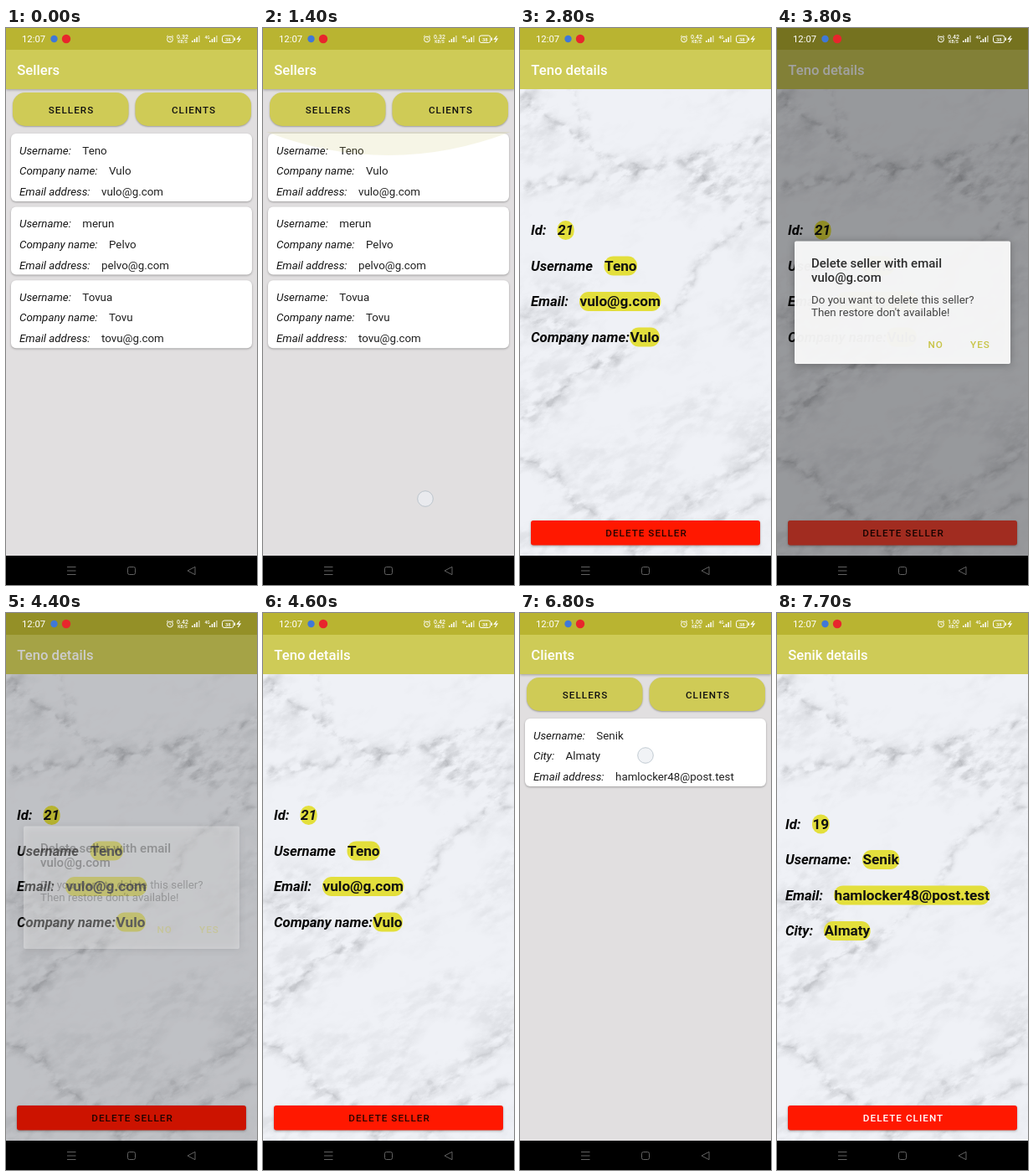
Recreate the animation shown at these times as an HTML page with a canvas. Size 300 by 665 pixels, loop 8 s.

```html
<!DOCTYPE html>
<html lang="en">
<head>
<meta charset="utf-8">
<title>Sellers</title>
<style>
html, body { margin: 0; width: 100%; height: 100%; overflow: hidden; background: #000; }
canvas { display: block; width: 300px; height: 665px; }
</style>
</head>
<body>
<canvas id="stage"></canvas>
<script>
const W = 300, H = 665, LOOP = 8000, NAV = 630, BAR = 73;
const stage = document.getElementById('stage');
const dpr = window.devicePixelRatio || 1;
stage.width = W * dpr;
stage.height = H * dpr;
const g = stage.getContext('2d');
g.scale(dpr, dpr);

const sellers = [
  ['Teno', 'Vulo', 'vulo@g.com'],
  ['merun', 'Pelvo', 'pelvo@g.com'],
  ['Tovua', 'Tovu', 'tovu@g.com']
].map(([user, firm, mail]) => [['Username:', user], ['Company name:', firm], ['Email address:', mail]]);
const clientMail = 'hamlocker48@post.test';
const clients = [[['Username:', 'Senik'], ['City:', 'Almaty'], ['Email address:', clientMail]]];

const sellerPage = {
  title: 'Teno details', x: 13, y: 247, action: 'DELETE SELLER', ink: '#250400', idStyle: 'italic ',
  rows: [['Id:', '21', 45], ['Username', 'Teno', 101], ['Email:', 'vulo@g.com', 71.5], ['Company name:', 'Vulo', 131.5]]
};
const clientPage = {
  title: 'Senik details', x: 10, y: 257.5, action: 'DELETE CLIENT', ink: '#fff', idStyle: '',
  rows: [['Id:', '19', 42.5], ['Username:', 'Senik', 102.5], ['Email:', clientMail, 68.5], ['City:', 'Almaty', 56.5]]
};

const clamp = v => Math.max(0, Math.min(1, v));
const ramp = (t, a, b) => clamp((t - a) / (b - a));
const easeOut = p => 1 - (1 - p) * (1 - p);

function text(s, x, y, font, color, { spacing = 0, align = 'left' } = {}) {
  g.font = font + ' Roboto, Arial, sans-serif';
  g.letterSpacing = spacing + 'px';
  g.textAlign = align;
  g.fillStyle = color;
  g.fillText(s, x, y);
  return g.measureText(s).width;
}

function box(x, y, w, h, r, color) {
  g.beginPath();
  g.roundRect(x, y, w, h, r);
  g.fillStyle = color;
  g.fill();
}

function disc(x, y, r, color) {
  g.beginPath();
  g.arc(x, y, r, 0, 7);
  g.fillStyle = color;
  g.fill();
}

function raised(x, y, w, h, r, color, blur = 3) {
  g.save();
  g.shadowColor = 'rgba(0,0,0,.3)';
  g.shadowBlur = blur * dpr;
  g.shadowOffsetY = dpr;
  box(x, y, w, h, r, color);
  g.restore();
}

function line(points, color = '#fff', width = 1, close = false) {
  g.beginPath();
  points.forEach(p => g.lineTo(...p));
  if (close) g.closePath();
  g.strokeStyle = color;
  g.lineWidth = width;
  g.stroke();
}

function hash(x, y) {
  let n = Math.imul(x, 374761393) + Math.imul(y, 668265263);
  n = Math.imul(n ^ (n >>> 13), 1274126177);
  return ((n ^ (n >>> 16)) >>> 0) / 4294967296;
}
function noise(x, y) {
  const i = Math.floor(x), j = Math.floor(y);
  const soft = v => v * v * (3 - 2 * v);
  const u = soft(x - i), v = soft(y - j);
  const top = hash(i, j) * (1 - u) + hash(i + 1, j) * u;
  const low = hash(i, j + 1) * (1 - u) + hash(i + 1, j + 1) * u;
  return top * (1 - v) + low * v;
}
function fbm(x, y) {
  let sum = 0, amp = .5;
  for (let k = 0; k < 5; k++, amp /= 2, x *= 2.03, y *= 2.03) sum += amp * noise(x + k * 17, y + k * 31);
  return sum / .97;
}

// Marble veins: width, then x/y points.
const veins = [
  [7, 0, 190, 55, 186, 130, 174, 205, 155, 300, 130],
  [10, 5, 76, 28, 106, 75, 130, 95, 152, 150, 172],
  [7, 60, 73, 78, 112, 70, 138, 98, 152],
  [26, 200, 185, 250, 190, 300, 185],
  [10, 205, 158, 232, 195, 262, 208, 300, 236],
  [12, 0, 342, 40, 352, 75, 378, 110, 408],
  [9, 0, 468, 38, 442, 72, 408, 130, 385, 190, 330],
  [9, 190, 330, 212, 275, 250, 250, 300, 200],
  [12, 0, 512, 42, 535, 70, 570, 118, 596, 145, 629],
  [18, 135, 629, 178, 580, 225, 552, 300, 500],
  [12, 195, 629, 232, 590, 300, 560]
];

function layer() {
  const c = document.createElement('canvas');
  c.width = W;
  c.height = NAV - BAR;
  return c.getContext('2d');
}

// Blurred bands mark where the stone is veined; fine noise breaks them up.
function makeMarble() {
  const mask = layer(), out = layer();
  const { width, height } = out.canvas;
  mask.translate(0, -BAR);
  mask.lineJoin = 'round';
  veins.forEach(([size, ...p]) => {
    mask.beginPath();
    for (let i = 0; i < p.length; i += 2) mask.lineTo(p[i], p[i + 1]);
    [[size, .45, size / 2], [2, .5, 1.5]].forEach(([w, alpha, blur]) => {
      mask.filter = `blur(${blur}px)`;
      mask.lineWidth = w;
      mask.strokeStyle = `rgba(0,0,0,${alpha})`;
      mask.stroke();
    });
  });
  const band = mask.getImageData(0, 0, width, height).data;
  const img = out.createImageData(width, height);
  for (let y = 0, i = 0; y < height; y++) {
    for (let x = 0; x < width; x++, i += 4) {
      const u = x - y * .5, v = y + x * .5;
      const cloud = clamp((fbm(u / 90 + 3, v / 55 + 9) - .4) * 3);
      const grain = clamp((fbm(u / 15, v / 8) - .32) * 2.6);
      const bx = clamp(Math.round(x + 12 * (noise(x / 9, y / 9) - .5)) / (width - 1)) * (width - 1);
      const by = clamp(Math.round(y + 14 * (noise(x / 9 + 40, y / 9) - .5)) / (height - 1)) * (height - 1);
      const vein = band[(Math.round(by) * width + Math.round(bx)) * 4 + 3] / 255;
      const s = 242 - 15 * cloud * grain - 58 * vein * grain;
      img.data.set([s - 3, s - 1, s + 4, 255], i);
    }
  }
  out.putImageData(img, 0, 0);
  return out.canvas;
}
const marble = makeMarble();

function appBar(title) {
  box(0, 20, W, BAR - 20, 0, '#cecb57');
  box(0, 0, W, 26, 0, '#b9b431');
  text(title, 13.3, 56, '500 16.67px', '#fff');
}

function card(rows, y) {
  raised(6, y, 288, 81, 6, '#fff', 2.5);
  rows.forEach(([label, value], i) => {
    const base = y + 24.5 + i * 24.7;
    const w = text(label, 16, base, 'italic 400 13.33px', '#161616');
    text(value, 16 + w + 13.5, base, '400 13.33px', '#202020');
  });
}

function listPage(title, items, glow) {
  box(0, 0, W, NAV, 0, '#e1dfe0');
  raised(0, 20, W, BAR - 20, 0, '#cecb57');
  appBar(title);
  [['SELLERS', 8], ['CLIENTS', 154.5]].forEach(([label, x]) => {
    raised(x, 77, 138.5, 40, 15, '#cfcb56', 2);
    text(label, x + 70, 101.5, '500 11.67px', '#111', { spacing: 1.04, align: 'center' });
  });
  items.forEach((rows, i) => card(rows, 126 + i * 87.6));
  if (glow > 0) {
    g.beginPath();
    g.moveTo(4, 124);
    g.quadraticCurveTo(150, 124 + 56 * glow, 296, 124);
    g.fillStyle = `rgba(190,185,80,${.14 * glow})`;
    g.fill();
  }
}

function detailPage(page, pressed) {
  g.drawImage(marble, 0, BAR);
  appBar(page.title);
  page.rows.forEach(([label, value, x], i) => {
    const y = page.y + i * 42.5;
    const font = (i ? '' : page.idStyle) + '700 17.2px';
    g.font = font + ' Roboto, Arial, sans-serif';
    g.letterSpacing = '0px';
    box(x - .5, y - 17, g.measureText(value).width + 1, 23, 11, '#e3df3c');
    text(label, page.x, y, 'italic 700 16.67px', '#080808');
    text(value, x, y, font, '#111');
  });
  raised(13, 588, 274, 29.5, 3, '#ff1800');
  if (pressed) box(13, 588, 274, 29.5, 3, 'rgba(255,255,255,.2)');
  text(page.action, 151, 607, '500 11.67px', page.ink, { spacing: 1.04, align: 'center' });
}

function dialog(alpha) {
  g.save();
  g.globalAlpha = alpha;
  raised(21, 254.5, 258, 146.5, 2, '#fbfbfb', 10);
  ['Delete seller with email', 'vulo@g.com'].forEach((s, i) => text(s, 41, 286 + i * 17.3, '500 15px', '#222'));
  ['Do you want to delete this seller?', "Then restore don't available!"]
    .forEach((s, i) => text(s, 41, 328.5 + i * 15.7, '400 13.33px', '#3a3a3a'));
  text('NO', 180.5, 382, '500 11.67px', '#c5c13c', { spacing: 1.04 });
  text('YES', 231, 382, '500 11.67px', '#c5c13c', { spacing: 1.04 });
  g.restore();
}

function bars(x, n) {
  for (let i = 0; i < n; i++) box(x + i * 2.7, 15 - i * 2, 1.5, 2 + i * 2, 0, i < 3 ? '#fff' : 'rgba(255,255,255,.6)');
}

function statusBar(speed) {
  const center = { align: 'center' };
  text('12:07', 19, 17, '400 11.3px', '#fff');
  disc(57.5, 13, 4.2, '#3f78d8');
  disc(72, 13, 5.2, '#e8262c');
  g.beginPath();
  g.arc(196, 13.5, 3.4, 0, 7);
  g.strokeStyle = '#fff';
  g.lineWidth = 1;
  g.stroke();
  line([[196, 11.5], [196, 13.8], [197.5, 14.2]], '#fff', .8);
  line([[192, 10.5], [193.7, 9]]);
  line([[198.3, 9], [200, 10.5]]);
  text(speed, 211, 12.5, '500 7px', '#fff', center);
  text('KB/S', 211, 18, '500 5px', '#fff', center);
  bars(222, 4);
  text('4G', 240.5, 13, '500 5px', '#fff', center);
  bars(243, 4);
  g.beginPath();
  g.roundRect(258.5, 9, 13.5, 8.5, 2.5);
  g.strokeStyle = '#fff';
  g.lineWidth = 1;
  g.stroke();
  text('38', 265.3, 15.5, '500 6px', '#fff', center);
  box(272.8, 11.5, 1.2, 3.5, 0, '#fff');
  line([[279.5, 9.5], [276.5, 13.3], [280, 13], [277.3, 17]], '#fff', 1.2);
}

function navBar() {
  box(0, NAV, W, H - NAV, 0, '#000');
  const grey = '#626262';
  [643.5, 648, 652.5].forEach(y => line([[73, y], [83.5, y]], grey));
  g.beginPath();
  g.roundRect(145.5, 643.5, 9, 9, 2);
  g.stroke();
  line([[217, 648], [226, 643.3], [226, 652.7]], grey, 1, true);
}

// Each tap or drag: start, end, from x/y, to x/y.
const touches = [
  [1000, 1500, 194, 380, 194, 562],
  [1800, 2050, 119, 177],
  [3500, 3700, 165, 603],
  [4100, 4300, 190, 378],
  [4700, 4850, 221, 648],
  [5400, 5650, 197.5, 101],
  [6700, 6850, 150, 170]
];

function touchDot(t) {
  const hit = touches.find(([a, b]) => t >= a && t < b);
  if (!hit) return;
  const [a, b, x, y, x2 = x, y2 = y] = hit;
  const p = easeOut(ramp(t, a, b - 100));
  disc(x + (x2 - x) * p, y + (y2 - y) * p, 9.3, 'rgba(236,239,242,.72)');
  g.strokeStyle = 'rgba(165,178,190,.65)';
  g.lineWidth = 1;
  g.stroke();
}

// The detail page slides over the list, which drifts left and darkens.
function slide(p, list, detail) {
  if (p < 1) {
    g.save();
    g.translate(-90 * p, 0);
    list();
    g.restore();
    box(0, 0, W, NAV, 0, `rgba(0,0,0,${.25 * p})`);
  }
  if (p > 0) {
    g.save();
    g.translate(W * (1 - p), 0);
    detail();
    g.restore();
  }
}

function render(t) {
  g.clearRect(0, 0, W, H);
  if (t < 5700) {
    const open = t < 4000 ? easeOut(ramp(t, 2200, 2500)) : 1 - easeOut(ramp(t, 4800, 5200));
    const glow = easeOut(ramp(t, 1000, 1400)) * (1 - ramp(t, 1400, 1600));
    slide(open, () => listPage('Sellers', sellers, glow),
      () => detailPage(sellerPage, t >= 3500 && t < 4000));
    const leave = 1 - ramp(t, 4200, 4500);
    const dim = .6 * ramp(t, 3640, 3900) * leave;
    if (dim > 0) {
      box(0, 0, W, NAV, 0, `rgba(0,0,0,${dim})`);
      dialog((.95 * ramp(t, 3640, 3800) + .05 * ramp(t, 3800, 3900)) * leave);
    }
  } else {
    slide(easeOut(ramp(t, 6900, 7300)), () => listPage('Clients', clients, 0), () => detailPage(clientPage, false));
  }
  statusBar(t < 2700 ? '0.32' : t < 6300 ? '0.42' : '1.00');
  navBar();
  touchDot(t);
}

const start = performance.now();
function tick() {
  const t = (performance.now() - start) % LOOP;
  render(Math.floor(t / 100) * 100);
  requestAnimationFrame(tick);
}
tick();
</script>
</body>
</html>
```
